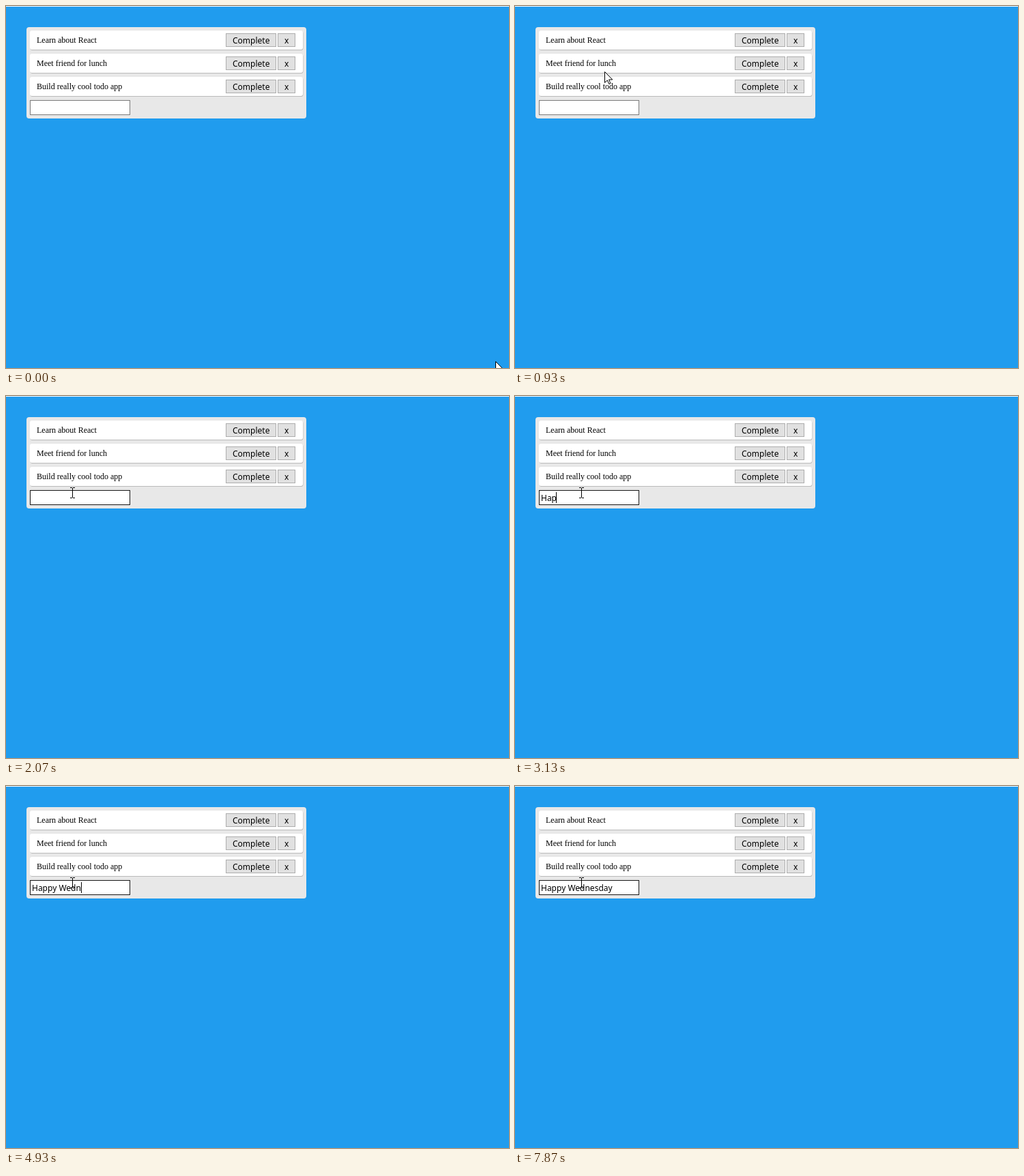
An HTML page for the animation above (8000 ms loop, 737 by 531 pixels).

```html
<!DOCTYPE html>
<html lang="en">
<head>
<meta charset="utf-8">
<title>Todo list</title>
<style>
html, body { margin: 0; width: 100%; height: 100%; overflow: hidden; background: #209cee; }
svg { display: block; }
text { white-space: pre; }
.task { font: 12px "Liberation Serif", "Times New Roman", serif; }
.ui { font: 12px "Noto Sans", "Open Sans", sans-serif; }
.crisp { shape-rendering: crispEdges; }
</style>
</head>
<body>
<svg id="stage" width="737" height="531" viewBox="0 0 737 531" xmlns="http://www.w3.org/2000/svg">
  <rect width="737" height="531" fill="#209cee"/>
  <rect width="737" height="1" fill="#fff"/>
  <rect x="30" y="31" width="410" height="134" rx="4" fill="#e8e8e8"/>
  <g id="rows"></g>
  <rect id="field" class="crisp" x="35.5" y="138.5" width="146" height="21" fill="#fff"/>
  <text id="typed" class="ui" x="38" y="154"></text>
  <rect id="caret" class="crisp" y="141" width="1" height="16"/>
  <path id="arrow" d="M.5 .5V16.5L4.3 12.9L6.8 18.5L9 17.5L6.6 12H11.8Z" fill="#fff" stroke="#000"/>
  <path id="beam" class="crisp" d="M-3 -8h3v1h1v-1h3v1h-3v14h3v1h-3v-1h-1v1h-3v-1h3v-14h-3z"/>
</svg>
<script>
const LOOP = 8000;
const MESSAGE = "Happy Wednesday";
const $ = id => document.getElementById(id);

function add(parent, tag, attrs, content = "") {
  const el = document.createElementNS("http://www.w3.org/2000/svg", tag);
  for (const key in attrs) el.setAttribute(key, attrs[key]);
  el.textContent = content;
  parent.append(el);
}

function addButton(x, y, width, label) {
  add($("rows"), "rect", {
    class: "crisp", x: x + .5, y: y + .5, width: width - 1, height: 19,
    fill: "#e1e1e1", stroke: "#adadad"
  });
  add($("rows"), "text", { class: "ui", x: x + 10, y: y + 15 }, label);
}

["Learn about React", "Meet friend for lunch", "Build really cool todo app"].forEach((task, i) => {
  const y = 36 + i * 34;
  const box = { x: 35, width: 400, height: 28, rx: 3 };
  add($("rows"), "rect", { ...box, x: 35.5, y: y + 1, fill: "#000", opacity: .2 });
  add($("rows"), "rect", { ...box, y, fill: "#fff" });
  add($("rows"), "text", { class: "task", x: 45, y: y + 18 }, task);
  addButton(322, y + 4, 74, "Complete");
  addButton(398, y + 4, 26, "x");
});

// Each list holds [start time, value...]; a value holds until the next start.
const pointer = [
  [0, "arrow", 717, 521], [70, "arrow", 702, 509], [130, "arrow", 677, 493], [200, ""],
  [600, "arrow", 168, 454], [670, "arrow", 160, 262], [730, "beam", 152, 149],
  [800, "arrow", 146, 118], [870, "arrow", 139, 103], [930, "arrow", 131, 96],
  [1000, "arrow", 123, 99], [1070, "arrow", 115, 108], [1130, "arrow", 109, 123],
  [1200, "arrow", 104, 137], [1270, "beam", 99, 144], [1330, "beam", 97, 142]
];
const border = [[0, "#7a7a7a"], [1530, "#444"], [1600, "#171717"]];
const keys = [
  [0, 38], [2730, 46], [2930, 53], [3130, 60], [3270, 67], [3530, 73], [3670, 77], [4000, 89],
  [4200, 96], [4600, 103], [4930, 110], [5200, 117], [5930, 123], [6200, 130], [6530, 137], [6730, 143]
];
const caretFlips = [
  1530, 2070, 2530, 4330, 4600, 4670, 4930, 5200, 5730, 6270, 6530, 6800, 7330, 7870
];

const lastIndex = (list, t) => list.findLastIndex(entry => entry[0] <= t);
const show = (el, on) => el.setAttribute("visibility", on ? "visible" : "hidden");

function render(t) {
  const [, shape, x, y] = pointer[lastIndex(pointer, t)];
  for (const id of ["arrow", "beam"]) {
    show($(id), id === shape);
    if (id === shape) $(id).setAttribute("transform", `translate(${x} ${y})`);
  }
  $("field").setAttribute("stroke", border[lastIndex(border, t)][1]);

  const count = lastIndex(keys, t);
  $("typed").textContent = MESSAGE.slice(0, count);
  $("caret").setAttribute("x", keys[count][1]);
  show($("caret"), caretFlips.filter(flip => flip <= t).length % 2);
}

const start = performance.now();
function tick() {
  render((performance.now() - start) % LOOP);
  requestAnimationFrame(tick);
}
tick();
</script>
</body>
</html>
```
